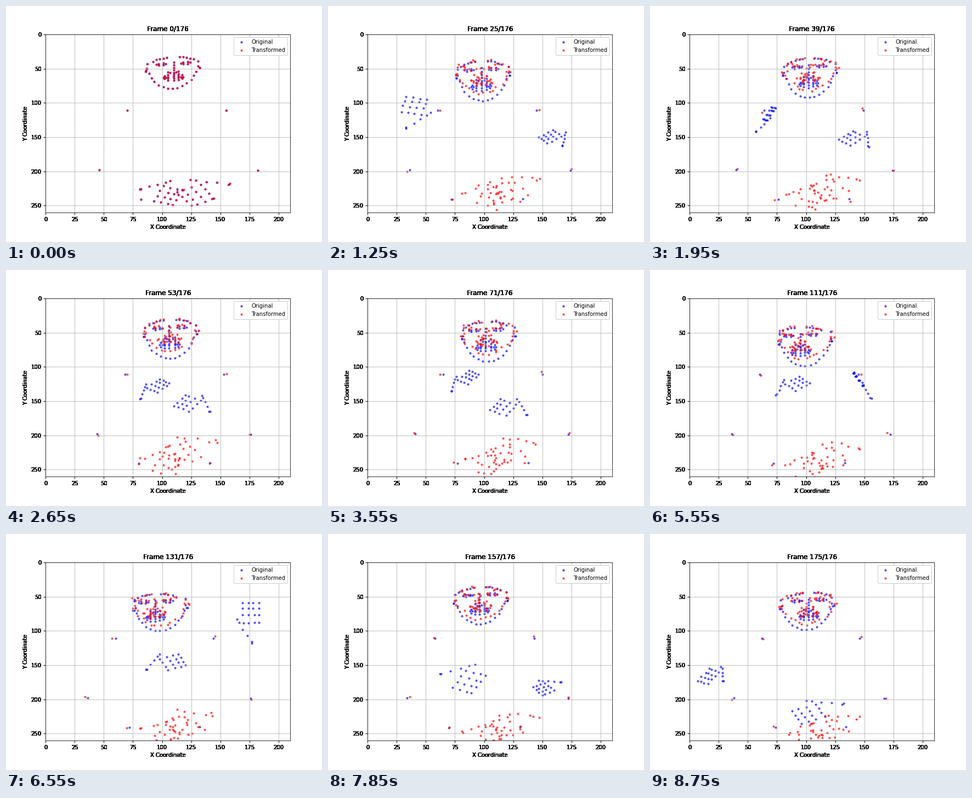
A matplotlib script for the animation above (8.8 s loop, 576 px wide and 432 px high).

```python
import numpy as np
import matplotlib.pyplot as plt
from matplotlib.animation import FuncAnimation

N = 176
TICK = np.arange(N)
BEATS = np.array([0, 25, 53, 90, 131, 157, 175])
rng = np.random.default_rng(4)

# Key poses, one per beat
# face: centre x, brow y, chin y, yaw
FACE = [(109, 33, 79, 0.5), (99, 39, 97, -1.5), (107, 31, 88, -0.5),
        (100, 37, 97, -4), (98.5, 46, 100, -4.5), (97, 36, 90, -1),
        (100.5, 44, 98, 1.5)]
# hands: wrist x, y, reach dx, dy, signed width (thumb side)
LEFT = [(81, 226, 32, 12, -23), (33, 137, 9, -44, 18), (81, 147, 21, -26, -11),
        (62, 124, 17, -30, -9), (86, 156, 31, -14, -17), (62, 163, 33, 15, -28),
        (29, 173, -17, -9, 20)]
RIGHT = [(158, 218, -39, 22, 24), (167, 163, -14, -18, 16), (141, 165, -26, -16, 18),
         (133, 176, -30, -14, 18), (177, 118, -1, -59, -14), (166, 175, -20, 13, 14),
         (132, 206, -40, 20, 20)]


def track(keys):
    """Ease between the key poses; one row per tick."""
    keys = np.array(keys, float)
    i = np.clip(np.searchsorted(BEATS, TICK, side="right") - 1, 0, len(BEATS) - 2)
    f = (TICK - BEATS[i]) / (BEATS[i + 1] - BEATS[i])
    f = (f * f * (3 - 2 * f))[:, None]
    return keys[i] + (keys[i + 1] - keys[i]) * f


def drift(pts, amp):
    """Slow wander of each point that starts from zero."""
    shape = (1,) + pts.shape[1:]
    rate = rng.uniform(0.08, 0.25, shape)
    phase = rng.uniform(0, 2 * np.pi, shape)
    t = TICK[:, None, None]
    return pts + amp * (np.sin(rate * t + phase) - np.sin(phase))


def hand_shape():
    """Joints as (along, across): wrist twice, thumb, four fingers."""
    thumb = np.outer([0.31, 0.58, 0.84, 1], [0.6, 0.9])
    fingers = [(along, across) for across in np.linspace(0.5, -0.5, 4)
               for along in (0.5, 0.7, 0.87, 1)]
    return np.concatenate([[(0, 0), (0.03, 0)], thumb, fingers])


def hand(poses):
    wrist, reach, width = poses[:, None, :2], poses[:, None, 2:4], poses[:, None, 4:]
    unit = reach / np.linalg.norm(reach, axis=2, keepdims=True)
    normal = unit[..., ::-1] * [-1, 1]
    along, across = hand_shape().T[:, None, :, None]
    return wrist + along * reach + across * width * normal


def ring(x, y, rx, ry, n):
    a = 2 * np.pi * np.arange(n) / n
    return np.c_[x + rx * np.cos(a), y + ry * np.sin(a)]


def face_shape():
    """Landmarks in face units, and how far each one turns with the head."""
    a = np.linspace(0, np.pi, 17)
    s = np.linspace(0, 1, 5)
    jaw = np.c_[-np.cos(a), 0.17 + 0.83 * np.sin(a)]
    ears = [(-1.05, 0.4), (-1.03, 0.4), (1.03, 0.4), (1.05, 0.4)]
    brow = np.c_[-0.8 + 0.56 * s, 0.01 + 0.1 * (1 - s) ** 2]
    bridge = np.c_[np.zeros(4), np.linspace(0.18, 0.42, 4)]
    nostrils = np.c_[0.4 * (s - 0.5), 0.46 + 0.04 * np.sin(np.pi * s)]
    outer = np.concatenate([jaw, ears])
    inner = np.concatenate([
        brow, brow * [-1, 1], bridge, nostrils,
        ring(-0.46, 0.21, 0.18, 0.03, 6), ring(0.48, 0.21, 0.18, 0.03, 6),
        ring(0, 0.64, 0.38, 0.1, 12), ring(0, 0.64, 0.28, 0.03, 8)])
    turn = np.repeat([0, 1], [len(outer), len(inner)])
    return *np.concatenate([outer, inner]).T, turn


def face(poses, height=None):
    u, v, turn = face_shape()
    cx, brow, chin, yaw = poses.T[:, :, None]
    return np.stack([cx + 22 * u + yaw * turn,
                     brow + (height or chin - brow) * v - 2 * u], 2)


def body(cx, wrist_x):
    """Shoulders, elbows and hips hang from the head; the right elbow follows its wrist."""
    x = np.stack([cx - 39, cx + 46, cx - 63, cx + 72 + 0.25 * (wrist_x - 153),
                  cx - 27, cx + 34], 1)
    y = np.broadcast_to([111.0, 111, 198, 199, 241, 240], x.shape)
    return np.stack([x, y], 2)


head, left, right = track(FACE), track(LEFT), track(RIGHT)
torso = body(head[:, 0], right[:, 0])
raw = np.round(np.concatenate([face(head), torso, hand(left), hand(right)], 1))

# The second set keeps its first hand pose and sinks slowly
sink = np.stack([0 * TICK, TICK / 8], 1)[:, None]
sway = np.stack([-11 * (1 - np.exp(-TICK / 15)),
                 -9 * np.sin(TICK * 2 * np.pi / 230)], 1)[:, None]
warp = np.concatenate([drift(face(head, 46), 1.2), drift(torso, 2),
                       drift(hand(left[:1]) + sink, 2),
                       drift(hand(right[:1]) + sway, 2)], 1)
warp = np.round(warp) + rng.normal(0, 0.15, (1,) + warp.shape[1:])

plt.rcParams.update({"font.family": "DejaVu Sans", "font.size": 10,
                     "xtick.major.width": 1, "ytick.major.width": 1,
                     "xtick.major.size": 4, "ytick.major.size": 4})
fig = plt.figure(figsize=(8, 6), dpi=72, facecolor="white")
ax = fig.add_axes([0.125, 0.125, 0.775, 0.755])
ax.set(xlim=(0, 210), ylim=(260, 0), xlabel="X Coordinate", ylabel="Y Coordinate",
       xticks=range(0, 201, 25), yticks=range(0, 251, 50))
ax.grid(True)
dots = [ax.scatter(*p[0].T, s=10, c=c, alpha=0.6, label=name)
        for p, c, name in ((raw, "blue", "Original"), (warp, "red", "Transformed"))]
ax.legend(loc="upper right", framealpha=1)
title = ax.set_title("")


def harden(text, times=14):
    """Paint the same text repeatedly so its soft edges turn black."""
    paint = text.draw

    def draw(renderer):
        for _ in range(times):
            paint(renderer)
    text.draw = draw


for text in [title, ax.xaxis.label, ax.yaxis.label,
             *ax.get_xticklabels(), *ax.get_yticklabels()]:
    harden(text)


def update(k):
    dots[0].set_offsets(raw[k])
    dots[1].set_offsets(warp[k])
    title.set_text(f"Frame {k}/{N}")
    return [*dots, title]


anim = FuncAnimation(fig, update, frames=N, interval=50, repeat=True, repeat_delay=0)
plt.show()
```
